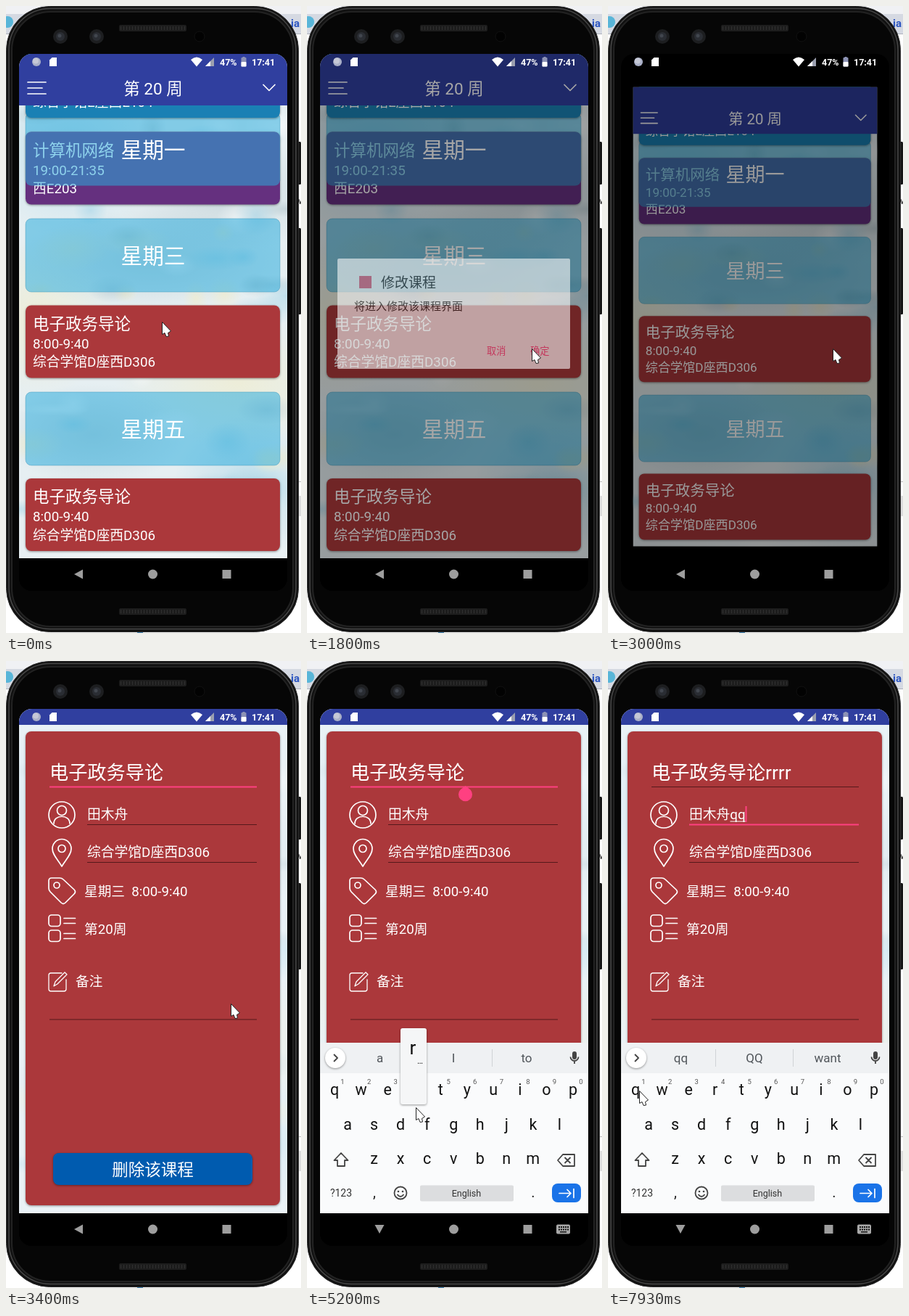
Recreate the animation shown at these times as an HTML page. Size 407x864 px, loop 8000 ms.

```html
<!DOCTYPE html>
<html lang="zh-CN">
<head>
<meta charset="utf-8">
<title>课程表</title>
<style>
html, body { margin: 0; width: 100%; height: 100%; overflow: hidden; background: #fff; }
svg { display: block; width: 407px; height: 864px; }
text { font-family: Roboto, "Noto Sans CJK SC", "Noto Sans CJK", sans-serif; white-space: pre; }
.line { fill: none; stroke: #fff; stroke-width: 1.7; stroke-linecap: round; stroke-linejoin: round; }
.key { fill: none; stroke: #444; stroke-width: 1.8; stroke-linejoin: round; }
.card { filter: drop-shadow(0 1px 1.5px rgba(0,0,0,.4)); }
.mid { text-anchor: middle; }
</style>
</head>
<body>
<svg id="stage" viewBox="0 0 407 864"></svg>
<script>
const LOOP = 8000;
const INDIGO = '#303f9f', RED = '#ab383b', PINK = '#ff4081';
const COURSE = '电子政务导论', TEACHER = '田木舟', ROOM = '综合学馆D座西D306';

const rect = (x, y, w, h, fill, rx = 0, more = '') =>
  `<rect x="${x}" y="${y}" width="${w}" height="${h}" rx="${rx}" fill="${fill}" ${more}/>`;
const circle = (x, y, r, fill, more = '') => `<circle cx="${x}" cy="${y}" r="${r}" fill="${fill}" ${more}/>`;
const text = (x, y, size, str, fill = '#fff', more = '') =>
  `<text x="${x}" y="${y}" font-size="${size}" fill="${fill}" ${more}>${str}</text>`;
const mid = (x, y, size, str, fill, more = '') => text(x, y, size, str, fill, 'class="mid" ' + more);
const path = (d, cls = 'line', more = '') => `<path d="${d}" class="${cls}" ${more}/>`;
const shape = (d, fill) => `<path d="${d}" fill="${fill}"/>`;
const group = (id, body, more = '') => `<g id="${id}" ${more}>${body}</g>`;
const clipped = (id, body) => `<g clip-path="url(#${id})">${body}</g>`;

// Soft watercolour backdrop: a few large washes and seeded mottling
const blob = (x, y, rx, ry, tint) => `<ellipse cx="${x}" cy="${y}" rx="${rx}" ry="${ry}" fill="url(#${tint})"/>`;
const tints = { blue: '#a3d3e6', cream: '#f3ecc4', mist: '#b4c6cc', white: '#fff' };
const gradients = Object.entries(tints).map(([id, c]) =>
  `<radialGradient id="${id}"><stop stop-color="${c}" stop-opacity=".55"/>
   <stop offset="1" stop-color="${c}" stop-opacity="0"/></radialGradient>`).join('');
let seed = 7;
const random = () => (seed = seed * 16807 % 2147483647) / 2147483647;
const mottling = Array.from({ length: 70 }, (_, i) =>
  blob(18 + 370 * random(), 150 + 590 * random(), 15 + 40 * random(), 8 + 22 * random(),
    Object.keys(tints)[i % 4])).join('');
const backdrop = rect(18, 66, 370, 695, '#e6eff2') +
  blob(90, 200, 130, 120, 'blue') + blob(300, 260, 150, 80, 'mist') + blob(200, 350, 190, 70, 'mist') +
  blob(40, 430, 110, 110, 'cream') + blob(320, 520, 170, 90, 'cream') +
  blob(120, 590, 130, 70, 'mist') + blob(330, 665, 100, 100, 'blue') + mottling + blob(210, 760, 220, 60, 'white');

const daySheet = y => rect(27, y, 351, 101, 'rgb(42,172,221)', 8, 'fill-opacity=".53" stroke="#3d93b5" stroke-opacity=".45"');
const day = (y, name) => daySheet(y) + mid(203, y + 62, 29.7, name, '#fff');
const course = (y, fill, name, time, room) =>
  rect(27, y, 351, 100, fill, 8, 'class="card"') + text(37, y + 33, 22.5, name) +
  text(37, y + 59, 18.8, time) + text(37, y + 84.5, 18.8, room);

const schedule = clipped('window', backdrop +
  daySheet(147) + course(173.5, '#65307f', '计算机网络', '19:00-21:35', '西E203') +
  clipped('overlap', daySheet(147)) + mid(203, 209, 29.7, '星期一', '#fff') +
  course(54, '#1a80b4', '', '', '综合学馆E座西E104') +
  day(293, '星期三') + course(412.5, RED, COURSE, '8:00-9:40', ROOM) +
  day(532, '星期五') + course(651, RED, COURSE, '8:00-9:40', ROOM) +
  rect(18, 66, 370, 71, INDIGO) +
  path('M30 105H55M30 113H50M30 121H55') +
  mid(203, 122, 22.5, '第 20 周', '#fff') + path('M355 108.5L363 116.5L371 108.5'));

const dialog = rect(42, 348, 321, 152, '#fafafa', 2) + rect(72, 372, 17, 17, '#df5a76') +
  text(102, 387.5, 19, '修改课程', '#222') + text(65, 418.5, 15, '将进入修改该课程界面', '#222') +
  text(248, 479.5, 13.2, '取消', PINK) + text(308, 479.5, 13.2, '确定', PINK);

const rule = y => rect(112, y, 234, 1, '#55191b');
const editor = clipped('window', backdrop + rect(18, 66, 370, 695, '#eef5fb', 0, 'fill-opacity=".5"') +
  rect(18, 66, 370, 22, INDIGO) + rect(27, 97, 351, 653, RED, 8, 'class="card"') +
  text(60, 163, 26.2, COURSE, '#fff', 'id="title"') + rect(60, 173, 286, 1, '#55191b') +
  rect(60, 172.5, 286, 2, PINK, 0, 'id="titleFocus"') + rect(217, 167, 0, 1, '#fff', 0, 'id="titleDraft"') +
  text(112, 218, 18.8, TEACHER, '#fff', 'id="name"') + rule(225) +
  rect(112, 224.5, 234, 2, PINK, 0, 'id="nameFocus"') + rect(168.5, 220.5, 0, 1, '#fff', 0, 'id="nameDraft"') +
  text(112, 270, 18.8, ROOM) + rule(277) +
  text(108, 324, 18.7, '星期三  8:00-9:40') + text(108, 376, 18.7, '第20周') + text(96, 447.5, 18.7, '备注') +
  rect(60, 493.5, 286, 1, '#55191b') +
  circle(77, 212, 18, 'none', 'class="line"') + circle(77, 206, 6.5, 'none', 'class="line"') +
  path('M66 224C66 211 88 211 88 224') +
  path('M77 283C71 273 64 267 64 258.5A13 13 0 0 1 90 258.5C90 267 83 273 77 283Z') +
  circle(77, 258.5, 5, 'none', 'class="line"') +
  path('M59 303Q59 299 63 299H74Q77 299 79 301L94 315Q97 318 94 321L82 333Q79 336 76 333L61 318Q59 316 59 313Z') +
  circle(70, 309, 4, 'none', 'class="line"') +
  [350, 371].map(y => rect(59, y, 16, 15.5, 'none', 4, 'class="line"') + path(`M80 ${y + 4.5}H95.5M80 ${y + 11.5}H95.5`)).join('') +
  path('M77 430H62Q59 430 59 433V452Q59 455 62 455H80Q83 455 83 452V439M66 448L68 442L81 429L84 432L71 445Z', 'line', 'style="stroke-width:1.3"') +
  rect(65, 678, 275, 44, '#005baf', 8, 'class="card"') + mid(202.5, 708.5, 22.5, '删除该课程', '#fff') +
  rect(0, 139, 2, 28, PINK, 0, 'id="caret"') +
  group('handle', shape('M0 0L6.8 5.2A9.5 9.5 0 1 1 -6.8 5.2Z', PINK)));

// Keyboard
const STEP = 36.55;
const keys = (row, x, y) => [...row].map((c, i) => mid(x + i * STEP, y, 21.5, c, '#111')).join('');
const keyboard = rect(18, 526, 370, 235, '#fafbfc') + rect(18, 526, 370, 42, '#eff1f3') +
  circle(39, 547, 14, '#fff', 'class="card"') + path('M37 542L42 547L37 552', 'key') +
  rect(148, 535, 1, 24, '#d0d3d6') + rect(255, 535, 1, 24, '#d0d3d6') +
  [100.5, 202, 303].map((x, i) => mid(x, 553, 17, '', '#50555a', `id="hint${i}"`)).join('') +
  rect(366, 538, 6, 11, '#444', 3) + path('M363.5 545.5A5.5 5.5 0 0 0 374.5 545.5M369 551V555', 'key') +
  keys('qwertyuiop', 38, 598) + keys('asdfghjkl', 56, 645.5) + keys('zxcvbnm', 92.5, 693) +
  [...'1234567890'].map((c, i) => mid(49 + i * STEP, 583, 9.5, c, '#555')).join('') +
  path('M47 678L37.5 688H42V696H52V688H56.5Z', 'key') +
  path('M353 680H369V696H353L346 688ZM355.5 684L363.5 692M363.5 684L355.5 692', 'key') +
  mid(47, 738, 14, '?123', '#333') + mid(93, 739, 20, ',', '#222') + mid(312, 739, 20, '.', '#222') +
  circle(129, 733, 8.5, 'none', 'class="key"') + circle(126, 731, 1.3, '#444') + circle(132, 731, 1.3, '#444') +
  path('M124.5 735Q129 741 133.5 735', 'key') +
  rect(156, 722.5, 129, 22, '#dcdddf', 2) + mid(220, 738, 12.5, 'English', '#333') +
  rect(338, 720, 40, 26, '#1a73e8', 8) + path('M348 733.5H364M359 728.5L364 733.5L359 738.5M368 727.5V739.5') +
  group('popup', rect(-18, 506, 36, 105, '#f5f6f7', 3, 'class="card"') +
    mid(-1, 542, 26, '', '#111', 'id="popupKey"') + mid(9, 555, 12, '…', '#111'));

const nav = rect(18, 761, 370, 45, '#000') +
  group('back', shape('M-6 0L6 -6.5V6.5Z', '#9e9e9e')) + circle(202.5, 783, 6.5, '#9e9e9e') +
  rect(298.5, 777, 12, 12, '#9e9e9e') +
  group('imeIcon', rect(344, 776.5, 19, 13, '#a8a8a8', 2) +
    path('M347 780H361M347 783.5H361', 'key', 'stroke-dasharray="2 1" style="stroke:#111"') + rect(349, 786, 9, 1.5, '#111'));

const status = circle(42, 77, 6, '#aab0c8') + circle(41, 75.5, 4, '#c5c8d6') +
  shape('M63.5 71H70V83H60V74.5Z', '#fff') +
  shape('M255 74Q263 67 271 74L263 83.5Z', '#fff') + shape('M287 71V83H275Z', '#9b9faf') + shape('M282 76V83H275Z', '#fff') +
  text(295, 82, 12.5, '47%', '#fff', 'font-weight="700"') + rect(324.5, 71, 7, 12.5, '#8d93b5', 1) +
  rect(326.5, 70, 3, 2, '#8d93b5') + rect(324.5, 77, 7, 6.5, '#fff', 1) +
  text(339, 82, 12.5, '17:41', '#fff', 'font-weight="700"');

const phone = rect(0, 0, 407, 11, '#f0f1f4') + rect(0, 11, 407, 28, '#d5d9e2') + rect(0, 38, 407, 1, '#aeb2ba') +
  circle(2, 22, 8, '#58b5d8') + text(393, 29, 15, 'ia', '#2d56c0', 'font-weight="700"') +
  text(403, 273, 13, 'w', '#222') + rect(402, 655, 5, 1, '#bbb') + rect(402, 675, 5, 28, '#ddd') +
  rect(165, 862, 70, 1, '#9bb') + rect(181, 861, 8, 3, '#4a8fc0') +
  rect(400, 187, 7, 59, '#161616', 1.5) + rect(400, 306, 7, 119, '#161616', 1.5) +
  rect(.5, .5, 403, 862, '#111', 60, 'stroke="#2c2c2c"') +
  rect(4, 3.5, 396, 855, 'none', 57, 'stroke="#484848" stroke-width="1.5"') +
  rect(8, 8, 388, 847, '#060606', 53, 'stroke="#222" stroke-width="2"') +
  [26, 830].map(y => rect(156, y, 93, 9, '#1d1d1d', 2) + path(`M158 ${y + 4.5}H247`, 'line', 'stroke-dasharray="1 3" style="stroke:#303030;stroke-width:5;stroke-linecap:butt"')).join('') +
  [75, 125].map(x => circle(x, 42, 10, '#1d1e20') + circle(x, 42, 6, '#2a2d33') + circle(x - 1, 41, 2.5, '#41464e')).join('') +
  circle(267, 42, 7, '#020202', 'stroke="#111"');

const clip = (id, x, y, w, h, rx) => `<clipPath id="${id}">${rect(x, y, w, h, '#000', rx)}</clipPath>`;
const stage = document.getElementById('stage');
stage.innerHTML = `<defs>${gradients}</defs>` +
  clip('screen', 18, 66, 370, 740, 18) + clip('window', 18, 66, 370, 695, 0) + clip('overlap', 27, 173.5, 351, 74, 8) +
  phone + clipped('screen', rect(18, 66, 370, 740, '#000') +
    group('schedule', schedule) + rect(18, 66, 370, 695, '#000', 0, 'id="dim"') + group('dialog', dialog) +
    group('editor', editor) + group('keyboard', keyboard) + nav + status) +
  group('cursor', '<path d="M.5 .5V17.5L4 15.5L6 20.5L9.5 20L8.5 15.5L12.5 13Z" fill="#fff" stroke="#222" stroke-linejoin="round"/>');

const el = Object.fromEntries([...stage.querySelectorAll('[id]')].map(e => [e.id, e]));
const ramp = (t, a, b) => Math.min(1, Math.max(0, (t - a) / (b - a)));
const easeOut = p => 1 - (1 - p) ** 2;
const smooth = p => p * p * (3 - 2 * p);
const within = (t, spans) => spans.some(([a, b]) => t >= a && t < b);
const count = (t, times) => times.filter(at => t >= at).length;
const show = (e, on) => e.setAttribute('visibility', on ? 'inherit' : 'hidden');
const move = (e, x, y, more = '') => e.setAttribute('transform', `translate(${x} ${y}) ${more}`);

// Each entry: start, end, x, y
const MOVES = [[50, 130, 199, 468], [1470, 1690, 310, 472], [3430, 3530, 264, 352], [3530, 3900, 216, 150],
  [4600, 5190, 150, 615], [5350, 5500, 148, 598], [6830, 7080, 160, 205], [7140, 7400, 40, 598], [7540, 7600, 43, 592]];
const R_TIMES = [5330, 5730, 6200, 6600], Q_TIMES = [7680, 7870];
const R_HOLDS = [[5195, 5330], [5590, 5730], [6065, 6200], [6465, 6600]], Q_HOLDS = [[7595, 7680], [7780, 7870]];
const CARET = [[3595, 3930], [4000, 4330], [4570, 5070], [5330, LOOP]];
const TAP = 3930, SWITCH = 7130;

function hints(r, q, inName) {
  if (q) return ['q'.repeat(q), 'Q'.repeat(q), 'want'];
  if (r && !inName) return ['r'.repeat(r), 'R'.repeat(r), 'are'];
  return ['a', 'I', 'to'];
}

function draw(t) {
  let x = 215, y = 435;
  for (const [a, b, nx, ny] of MOVES) {
    const p = smooth(ramp(t, a, b));
    x += (nx - x) * p;
    y += (ny - y) * p;
  }
  move(el.cursor, x, y);

  const open = t >= 1265, closing = 1 - ramp(t, 1730, 1900);
  el.dialog.setAttribute('opacity', open ? (.86 + .14 * ramp(t, 1270, 1400)) * closing : 0);
  el.dim.setAttribute('opacity', open ? (.14 + .46 * ramp(t, 1270, 1470)) * closing : 0);

  const away = smooth(ramp(t, 2730, 2990)), scale = 1 - .089 * away;
  move(el.schedule, 203 * (1 - scale), 51.4 * away, `scale(${scale})`);
  el.schedule.setAttribute('opacity', 1 - .4 * away);
  show(el.schedule, t < 3400);
  show(el.editor, t > 3010);
  move(el.editor, 0, 695 * (1 - easeOut(ramp(t, 3010, 3390))));

  const typing = t >= 4325;
  show(el.keyboard, typing);
  show(el.imeIcon, typing);
  move(el.keyboard, 0, 235 * (1 - easeOut(ramp(t, 4290, 4560))));
  move(el.back, 100, 783, typing ? 'rotate(-90)' : '');

  const r = count(t, R_TIMES), q = count(t, Q_TIMES), inName = t >= SWITCH;
  el.title.textContent = COURSE + 'r'.repeat(r);
  el.name.textContent = TEACHER + 'q'.repeat(q);
  el.titleDraft.setAttribute('width', inName ? 0 : 8.9 * r);
  el.nameDraft.setAttribute('width', 10.7 * q);
  show(el.titleFocus, !inName);
  show(el.nameFocus, inName);
  hints(r, q, inName).forEach((word, i) => el['hint' + i].textContent = word);

  const caretX = inName ? 168.5 + 10.5 * q : t < TAP ? 60 : 217.5 + 8.9 * r;
  el.caret.setAttribute('x', caretX);
  el.caret.setAttribute('y', inName ? 200 : 139);
  el.caret.setAttribute('height', inName ? 22 : 28);
  show(el.caret, within(t, CARET));
  show(el.handle, within(t, [[TAP, R_TIMES[0]], [SWITCH, Q_TIMES[0]]]));
  move(el.handle, caretX + 1, inName ? 224 : 172);

  const onR = within(t, R_HOLDS), onQ = within(t, Q_HOLDS);
  show(el.popup, onR || onQ);
  move(el.popup, onQ ? 38 : 147, 0);
  el.popupKey.textContent = onQ ? 'q' : 'r';
}

const start = performance.now();
function tick() {
  draw((performance.now() - start) % LOOP);
  requestAnimationFrame(tick);
}
tick();
</script>
</body>
</html>
```
